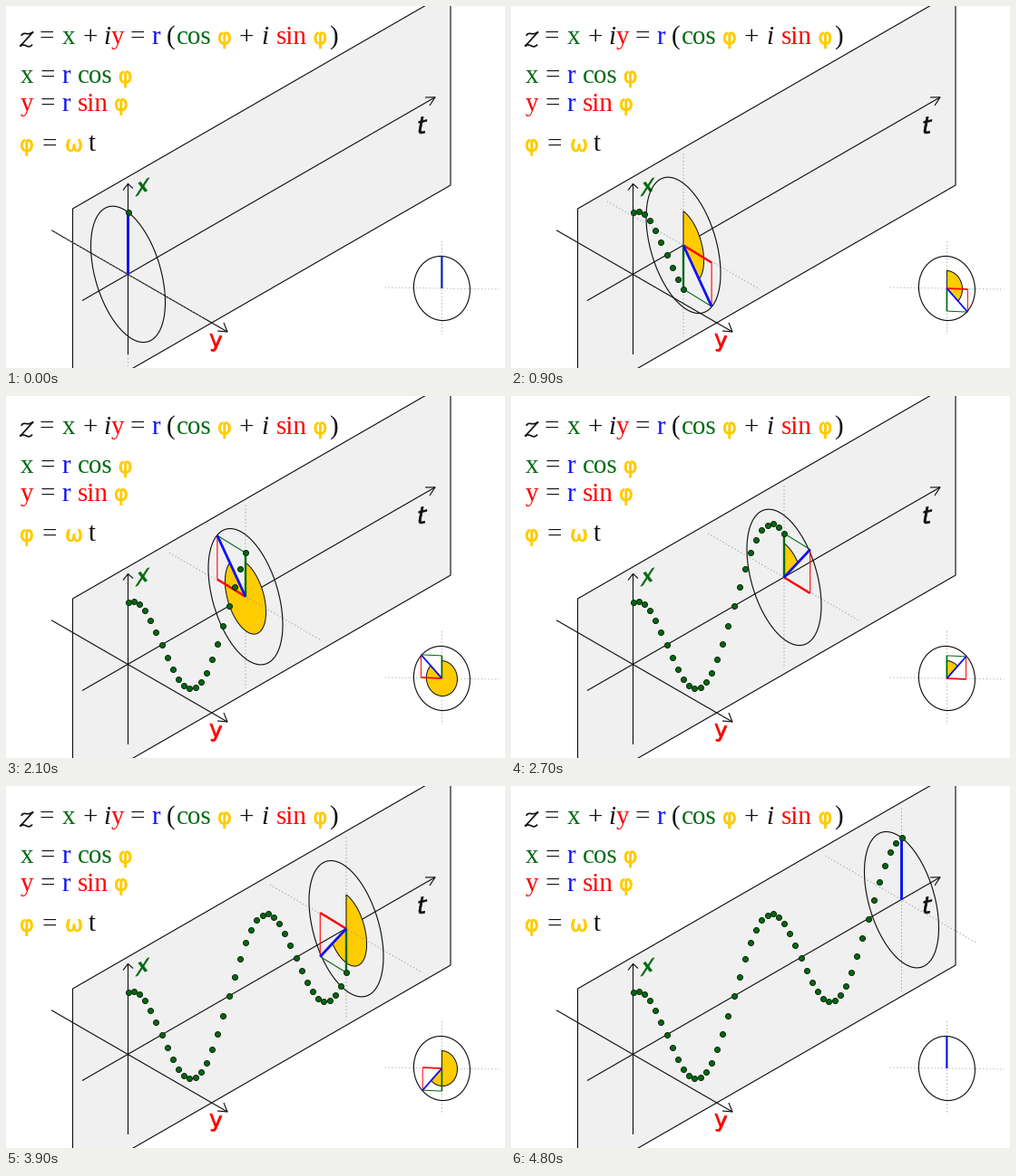
A matplotlib script that plays this animation: 550x400 px, repeating every 7800 ms.

```python
import numpy as np
import matplotlib.pyplot as plt
from matplotlib.animation import FuncAnimation
from matplotlib.patches import PathPatch, Polygon
from matplotlib.path import Path
from matplotlib.patheffects import withStroke
from matplotlib.textpath import TextPath
from matplotlib.transforms import Affine2D

W, H, DPI = 550, 400, 100
PX = 72 / DPI
STEPS, FRAMES, INTERVAL = 48, 78, 100
TURN = np.radians(15)

INK, RED, GREEN, BLUE, GOLD = "#111111", "#ff0000", "#006a10", "#1010ff", "#ffcc00"
START, END = np.array([134.5, 296.4]), np.array([430.5, 125.7])
RADIUS = 68.5

plt.rcParams["path.snap"] = False
fig = plt.figure(figsize=(W / DPI, H / DPI), dpi=DPI, facecolor="white")
ax = fig.add_axes([0, 0, 1, 1])
ax.set_xlim(0, W)
ax.set_ylim(H, 0)
ax.axis("off")


def line(points=((0, 0),), color=INK, width=1.15, z=3, **kw):
    x, y = zip(*points)
    kw.setdefault("solid_capstyle", "butt")
    return ax.plot(x, y, color=color, lw=width * PX, zorder=z, **kw)[0]


def dotted(points=((0, 0),), color="#999999", z=2):
    return line(points, color, 1, z, linestyle=(0, (1.2, 2.6)))


def center(k):
    return START + (END - START) * k / STEPS


class Phasor:
    """Ellipse with its radius, both components and the swept angle."""

    def __init__(self, up, rim, side, widths):
        self.up, self.rim, self.side = up, np.array(rim), np.array(side)
        thick, thin, main = widths
        self.wedge = Polygon([(0, 0)] * 3, fc=GOLD, ec=INK, lw=PX, zorder=4)
        ax.add_patch(self.wedge)
        self.ring = line(z=5)
        self.red_thin = line(color=RED, width=thin, z=6)
        self.green_thin = line(color=GREEN, width=thin, z=6)
        self.red = line(color=RED, width=thick, z=6)
        self.green = line(color=GREEN, width=thick, z=6)
        self.blue = line(color=BLUE, width=main, z=7)

    def arc(self, s, scale=1.0):
        x = self.rim[0] * np.sin(s)
        y = self.rim[1] * np.sin(s) - self.up * np.cos(s)
        return np.column_stack([x, y]) * scale

    def update(self, c, angle):
        squeeze = 1 - 0.04 * np.sin(2 * angle)
        red = self.side * squeeze * np.sin(angle)
        green = np.array([0, -self.up * np.cos(angle)])
        tip = red + green
        shapes = [(self.red, (0 * c, red)), (self.green, (0 * c, green)),
                  (self.red_thin, (red, tip)), (self.green_thin, (green, tip)),
                  (self.blue, (0 * c, tip)),
                  (self.ring, self.arc(np.linspace(0, 2 * np.pi, 121)))]
        for art, pts in shapes:
            art.set_data(*(np.array(pts) + c).T)

        # end of the wedge lies on the blue radius
        a, b = self.rim
        end = np.arctan2(tip[0] / a, (tip[0] * b / a - tip[1]) / self.up)
        end %= 2 * np.pi
        swept = 1e-3 < end < 2 * np.pi - 1e-3
        self.wedge.set_visible(swept)
        if swept:
            sector = self.arc(np.linspace(0, end, 80), 0.55)
            self.wedge.set_xy(np.vstack([[0, 0], sector]) + c)


def write(x, y, s, color=INK, italic=False):
    greek = s in "φω"
    text = ax.text(x, y, s, color=color, zorder=10, va="baseline",
                   family="DejaVu Sans" if greek else "Liberation Serif",
                   size=(24 if greek else 29) * PX,
                   style="italic" if italic else "normal")
    if greek:
        text.set_path_effects([withStroke(linewidth=0.7 * PX, foreground=color)])


def label(x, y, s, color, size, rise, style="oblique"):
    prop = dict(family="DejaVu Sans", style=style)
    path = TextPath((0, 0), s, size=size, prop=prop)
    path = path.transformed(Affine2D.from_values(1, -rise, 0, -1, x, y))
    ax.add_patch(PathPatch(path, fc=color, ec=color, lw=0.7 * PX, zorder=3))


# slanted panel and axes
ax.add_patch(Polygon([(73.5, 224), (490, -16.5), (490, 198), (73.5, 438.5)],
                     fc="#f0f0f0", ec=INK, lw=1.15 * PX, zorder=1))
line([(134.5, 385), (134.5, 196)])
line([(129, 203.5), (134.5, 196.5), (140, 201.5)])
line([(50, 247.7), (244, 360)])
line([(240, 350), (244, 360), (233, 359)])
line([(84, 325.5), (473, 100.8)])
line([(462, 101), (473, 100.8), (467, 110)])
label(143.5, 210, "x", GREEN, 24, 0.5)
label(453, 142, "t", INK, 26, 0.2)
label(224, 375.5, "y", RED, 25, -0.2, "normal")

# front view cross
dotted([(480.5, 260), (480.5, 363)], "#aaaaaa")
dotted([(417.5, 311), (543.5, 313)], "#aaaaaa")

# formulas; the script z is a single stroke
z_curve = Path([(17, 33), (19, 27), (24, 34), (30, 28.5), (15.5, 44.5),
                (21, 39.5), (24, 49), (29, 42.5)],
               [1, 4, 4, 4, 2, 4, 4, 4])
ax.add_patch(PathPatch(z_curve, fc="none", ec=INK, lw=1.7 * PX, zorder=10))
for x, s, color in [(37, "=", INK), (62, "x", GREEN), (84, "+", INK),
                    (115.5, "y", RED), (136, "=", INK), (160.5, "r", BLUE),
                    (177, "(", INK), (187.5, "cos", GREEN), (233, "φ", GOLD),
                    (257, "+", INK), (297.5, "sin", RED), (338.5, "φ", GOLD),
                    (355.7, ")", INK)]:
    write(x, 42, s, color)
write(107.5, 42, "i", italic=True)
write(281.5, 42, "i", italic=True)
for y, name, func, color, phi_x in [(85, "x", "cos", GREEN, 123.7),
                                    (115.5, "y", "sin", RED, 119)]:
    write(15.5, y, name, color)
    write(37.5, y, "=")
    write(61, y, "r", BLUE)
    write(78.7, y, func, color)
    write(phi_x, y, "φ", GOLD)
for x, s, color in [(15, "φ", GOLD), (39.5, "=", INK), (65, "ω", GOLD),
                    (91.2, "t", INK)]:
    write(x, 160.5, s, color)

# moving parts
cross_x, cross_y = dotted(), dotted(z=4.5)
big = Phasor(RADIUS, (41, 31), (42.3, 26), (2.4, 1.1, 2.8))
small = Phasor(35.5, (31, 1.5), (31.2, 1.4), (1.7, 1, 1.8))
trail = line(color=GREEN, z=8, linestyle="none", marker="o",
             markersize=6 * PX, markeredgecolor="#0a260a",
             markeredgewidth=PX)
steps = np.arange(STEPS + 1)
wave = np.array([center(j) - (0, RADIUS * np.cos(j * TURN)) for j in steps])


def draw(n):
    k = min(n, STEPS)
    c = center(k)
    cross_x.set_data([c[0]] * 2, [c[1] - 101, c[1] + 101])
    cross_y.set_data([c[0] - 84, c[0] + 84], [c[1] - 48.5, c[1] + 48.5])
    big.update(c, k * TURN)
    small.update(np.array([480.4, 312]), k * TURN)
    trail.set_data(*wave[:k + 1].T)
    return []


anim = FuncAnimation(fig, draw, frames=FRAMES, interval=INTERVAL,
                     init_func=lambda: draw(0), repeat=True, repeat_delay=0)
plt.show()
```
